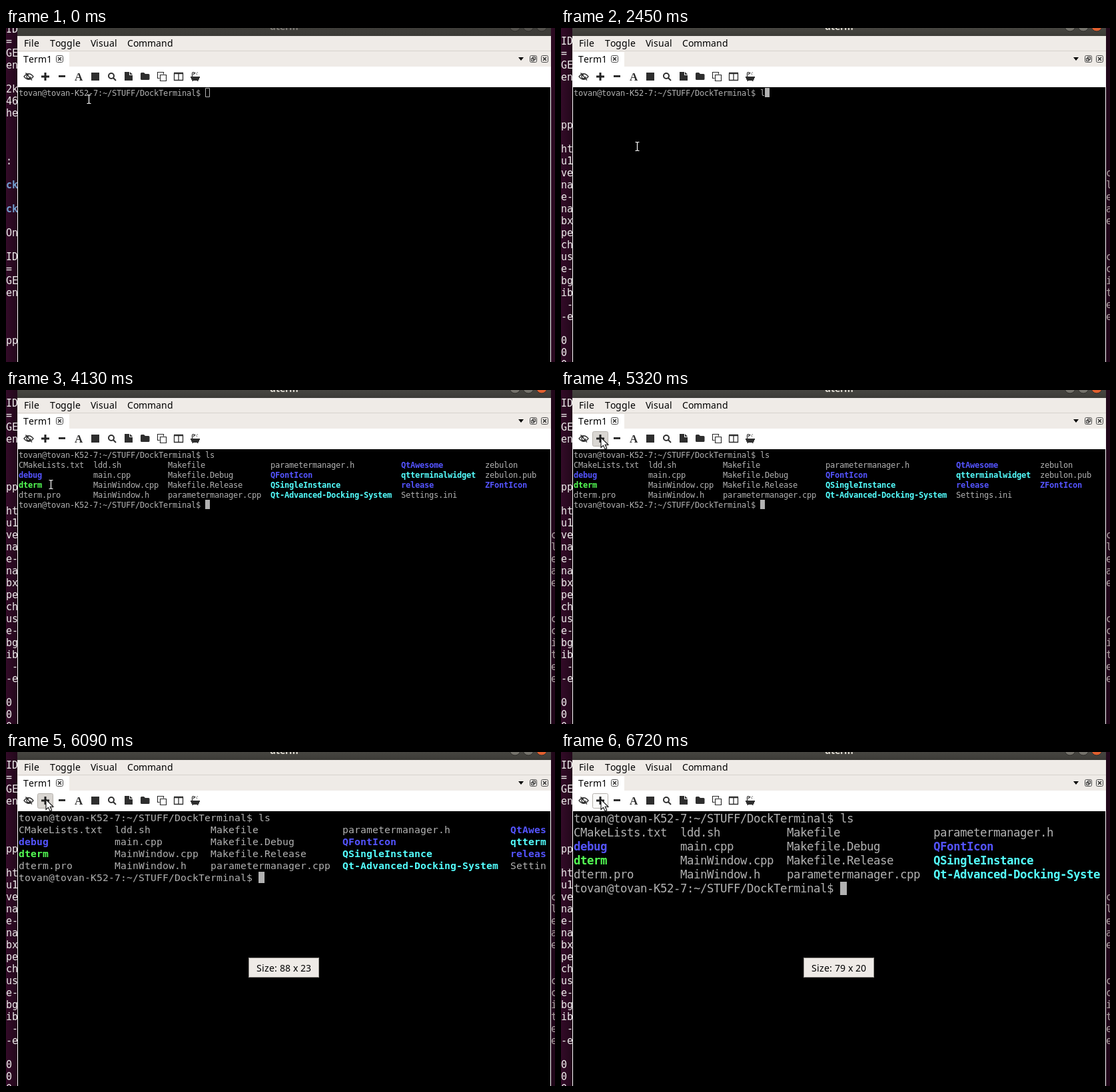
Write an HTML page with a canvas that moves like this. It is 824 by 502 pixels and loops after 8000 ms.

```html
<!DOCTYPE html>
<html lang="en">
<head>
<meta charset="utf-8">
<title>Terminal zoom</title>
<style>
  html, body { margin: 0; width: 100%; height: 100%; overflow: hidden; background: #2d0922; }
  canvas { display: block; }
</style>
</head>
<body>
<canvas id="stage" width="824" height="502"></canvas>
<script>
const ctx = document.getElementById('stage').getContext('2d');
const LOOP = 8000;
const MONO = '"DejaVu Sans Mono", monospace';
const SANS = '"Noto Sans", sans-serif';
const INK = '#2e2e2e', GREY = '#b2b2b2', CHROME = '#efebe7';
const COLORS = { dir: '#5454ff', link: '#54ffff', exec: '#54ff54' };

const FOCUS = 350, SCROLL = 420, ENTER = 3150, HOVER = 4830;
const PROMPT = 'tovan@tovan-K52-7:~/STUFF/DockTerminal$ ';
const COLUMNS = [0, 16, 32, 54, 82, 100];
const LISTING = [
  'CMakeLists.txt ldd.sh Makefile parametermanager.h QtAwesome:dir zebulon',
  'debug:dir main.cpp Makefile.Debug QFontIcon:dir qtterminalwidget:link zebulon.pub',
  'dterm:exec MainWindow.cpp Makefile.Release QSingleInstance:link release:dir ZFontIcon:dir',
  'dterm.pro MainWindow.h parametermanager.cpp Qt-Advanced-Docking-System:link Settings.ini'
].map(line => line.split(' ').map(item => item.split(':')));

const ZOOMS = [
  { at: 0, pt: 9, line: 15 },
  { at: 5530, pt: 10, line: 17 },
  { at: 5950, pt: 11, line: 18 },
  { at: 6300, pt: 12, line: 19 },
  { at: 6720, pt: 13, line: 21 }
];
const PRESSES = [[5320, 5530], [5740, 5950], [6090, 6300], [6510, 6720]];

// time, x, y of the pointer; it jumps from place to place
const POINTER = [
  [0, 124, 107], [70, 125, 109], [140, 127, 113], [210, 129, 117],
  [350, 132, 118], [420, 136, 119], [560, 134, 150], [630, 125, 178],
  [700, 118, 184], [770, 114, 178], [4130, 67, 142], [4200, 50, 112],
  [4270, 33, 59], [4340, 49, 45], [4480, 51, 42], [4550, 54, 41],
  [4620, 57, 44], [4690, 60, 49], [4760, 62, 56], [4830, 62, 64],
  [4900, 61, 70], [5110, 60, 72]
];
const ARROW_FROM = 4270;

// rows of the terminal behind, 18 px apart; * marks bold blue
const BEHIND_BEFORE = 'ID|=|GE|en||2k|46|he||||:||*ck||*ck||On||ID|=|GE|en||||pp'.split('|');
const BEHIND_AFTER = '|ID|=|GE|en||||pp||ht|u1|ve|na|e-|na|bx|pe|ch|us|e-|bg|ib| -|-e||0|0|0'.split('|');
const BEHIND_RIGHT = '||||||||||||c|l|e|a|e|||c|c|i|t|e|e'.split('|');

const latest = (list, t, time) => list.filter(item => time(item) <= t).pop();

function rect(x, y, w, h, color) {
  ctx.fillStyle = color;
  ctx.fillRect(x, y, w, h);
}

function frame(x, y, w, h, color, radius = 0) {
  ctx.strokeStyle = color;
  ctx.lineWidth = 1;
  ctx.beginPath();
  ctx.roundRect(x + .5, y + .5, w - 1, h - 1, radius);
  ctx.stroke();
}

function path(d, color, width) {
  const shape = new Path2D(d);
  if (width) {
    ctx.strokeStyle = color;
    ctx.lineWidth = width;
    ctx.stroke(shape);
  } else {
    ctx.fillStyle = color;
    ctx.fill(shape);
  }
}

// Letters advance by whole pixels, as hinted desktop text does.
function text(str, x, y, font, color) {
  ctx.font = font;
  ctx.fillStyle = color;
  for (const ch of str) {
    ctx.fillText(ch, x, y);
    x += Math.round(ctx.measureText(ch).width);
  }
}

function drawBehind(t) {
  rect(0, 0, 824, 502, '#2d0922');
  const shade = ctx.createLinearGradient(0, 0, 17, 0);
  shade.addColorStop(0, '#330b28');
  shade.addColorStop(1, '#22071a');
  rect(0, 0, 17, 502, shade);
  rect(818, 0, 6, 502, t < FOCUS ? '#2b0a21' : '#21071a');
  const print = (rows, x, color) => rows.forEach((row, i) => {
    const bold = row[0] === '*';
    text(row.replace('*', ''), x, 7 + 18 * i, (bold ? 'bold ' : '') + '15px ' + MONO, bold ? '#729fcf' : color);
  });
  print(t < SCROLL ? BEHIND_BEFORE : BEHIND_AFTER, 0, '#eeeeec');
  if (t >= SCROLL) print(BEHIND_RIGHT, 818, '#a9a09f');
}

function closeBox(x, y) {
  frame(x - 5, y - 5, 11, 11, '#4a4a4a', 2);
  path(`M${x - 2} ${y - 2}l5 5m0-5l-5 5`, INK, 1.5);
}

function drawChrome(t) {
  const focused = t >= FOCUS;
  rect(17, 0, 801, 502, '#fff');
  const bar = ctx.createLinearGradient(0, 0, 0, 12);
  bar.addColorStop(0, focused ? '#474641' : '#3f3e3a');
  bar.addColorStop(1, '#3c3b37');
  rect(17, 0, 801, 12, bar);
  text('dterm', 396, 3, 'bold 14px ' + SANS, focused ? '#dfdbd2' : '#807d78');
  [764, 784, 804].forEach((x, i) => {
    ctx.beginPath();
    ctx.arc(x, -3, 8, 0, 7);
    ctx.fillStyle = focused && i === 2 ? '#e2602f' : focused ? '#75736c' : '#55534e';
    ctx.fill();
    ctx.strokeStyle = '#2f2e2b';
    ctx.lineWidth = 1;
    ctx.stroke();
  });

  rect(17, 12, 801, 46, CHROME);
  rect(17, 34, 801, 1, '#d6d2cd');
  const menu = '14px ' + SANS;
  text('File', 27, 28, menu, '#000');
  text('Toggle', 66, 28, menu, '#000');
  text('Visual', 127, 28, menu, '#000');
  text('Command', 182, 28, menu, '#000');

  rect(18, 36, 77, 22, '#fff');
  text('Term1', 26, 52, menu, '#000');
  closeBox(80, 46);
  path('M769 44h8l-4 5z', '#000');
  frame(786, 41, 11, 11, '#4a4a4a', 2);
  frame(788, 45, 5, 5, INK);
  frame(790, 43, 5, 5, INK);
  closeBox(808, 46);
}

function drawToolbar(t) {
  if (t >= HOVER) {
    const pressed = PRESSES.some(([down, up]) => t >= down && t < up);
    rect(48, 63, 22, 21, pressed ? '#d9d6d2' : '#fafaf9');
    frame(47, 62, 24, 23, '#b5b1ac', 2);
  }
  path('M27 73Q34 64.500 41 73Q34 81.500 27 73zM34 70a3 3 0 1 0 3 3M29.500 67.500l9.500 11', INK, 1.3);
  path('M57.500 67h3v4.500h4.500v3h-4.500v4.500h-3v-4.500h-4.500v-3h4.500z', '#222');
  rect(79, 71, 10, 3, INK);
  text('A', 103, 79, 'bold 17px "Liberation Serif", serif', INK);
  rect(128, 67, 12, 12, INK);
  path('M162 72a4 4 0 1 0-8 0a4 4 0 1 0 8 0M161 75l4 4', INK, 2);
  path('M178 66h7v5h5v8h-12zM186 66l4 4h-4z', INK);
  path('M202 68.500q0-1.500 1.500-1.500h3.500l2 2h5q1.500 0 1.500 1.500v6q0 1.500-1.500 1.500h-10.500q-1.500 0-1.500-1.500z', INK);
  path('M230.500 75.500h-3v-9h9v3M231.500 70.500h9v9h-9z', INK, 1.2);
  path('M252.500 68.500h13v10h-13zM259 68v10M252 67.500h14', INK, 1.3);
  path('M277 73h14v2h-1v2l-1.500 1.500v1.500h-1.500v-1h-6v1h-1.500v-1.500l-1.500-1.500v-2h-1z', INK);
  path('M279.500 73v-5q0-1.500 1.500-1.500t1.500 1.500M281 70l3-3M285 68h1m0 2h1m0-3h1', INK, 1.2);
}

function drawTerminal(t) {
  const zoom = latest(ZOOMS, t, z => z.at);
  const px = zoom.pt * 4 / 3;
  const cell = Math.round(px * .602);
  const cols = Math.floor(799 / cell);
  rect(18, 89, 799, 413, '#000');

  const print = (str, col, row, kind) => text(
    str.slice(0, Math.max(0, cols - col)), 19 + col * cell, 93 + zoom.pt + row * zoom.line,
    `${kind ? 'bold ' : ''}${px}px ${MONO}`, COLORS[kind] || GREY);

  const typed = t < 2450 ? '' : t < 2590 ? 'l' : 'ls';
  print(PROMPT + typed, 0, 0);
  let row = 0, col = PROMPT.length + typed.length;
  if (t >= ENTER) {
    LISTING.forEach((items, i) =>
      items.forEach(([name, kind], j) => print(name, COLUMNS[j], i + 1, kind)));
    row = LISTING.length + 1;
    col = PROMPT.length;
    print(PROMPT, 0, row);
  }
  const cursor = [19 + col * cell, 90 + row * zoom.line, cell, zoom.line - 1];
  if (t < FOCUS) frame(...cursor, GREY);
  else rect(...cursor, GREY);

  if (zoom.at) {
    rect(364, 309, 106, 30, CHROME);
    frame(364, 309, 106, 30, '#96938e');
    text(`Size: ${cols} x ${Math.floor(431 / zoom.line)}`, 376, 330, '14px ' + SANS, '#000');
  }
}

function drawPointer(t) {
  const [, x, y] = latest(POINTER, t, p => p[0]);
  ctx.save();
  ctx.translate(x, y);
  if (t < ARROW_FROM) {
    const beam = 'M-2.500-6.500h2l1 1l1-1h2M.500-6v12M-2.500 6.500h2l1-1l1 1h2';
    path(beam, '#000', 2.5);
    path(beam, '#fff', 1.2);
  } else {
    const arrow = 'M0-.500v15l3.500-3.200l2.700 5.700l2.600-1.200l-2.600-5.500h4.800z';
    path(arrow, '#fff');
    path(arrow, '#111', 1.1);
  }
  ctx.restore();
}

function draw(now) {
  const t = now % LOOP;
  drawBehind(t);
  drawChrome(t);
  drawToolbar(t);
  drawTerminal(t);
  drawPointer(t);
  requestAnimationFrame(draw);
}
requestAnimationFrame(draw);
</script>
</body>
</html>
```
